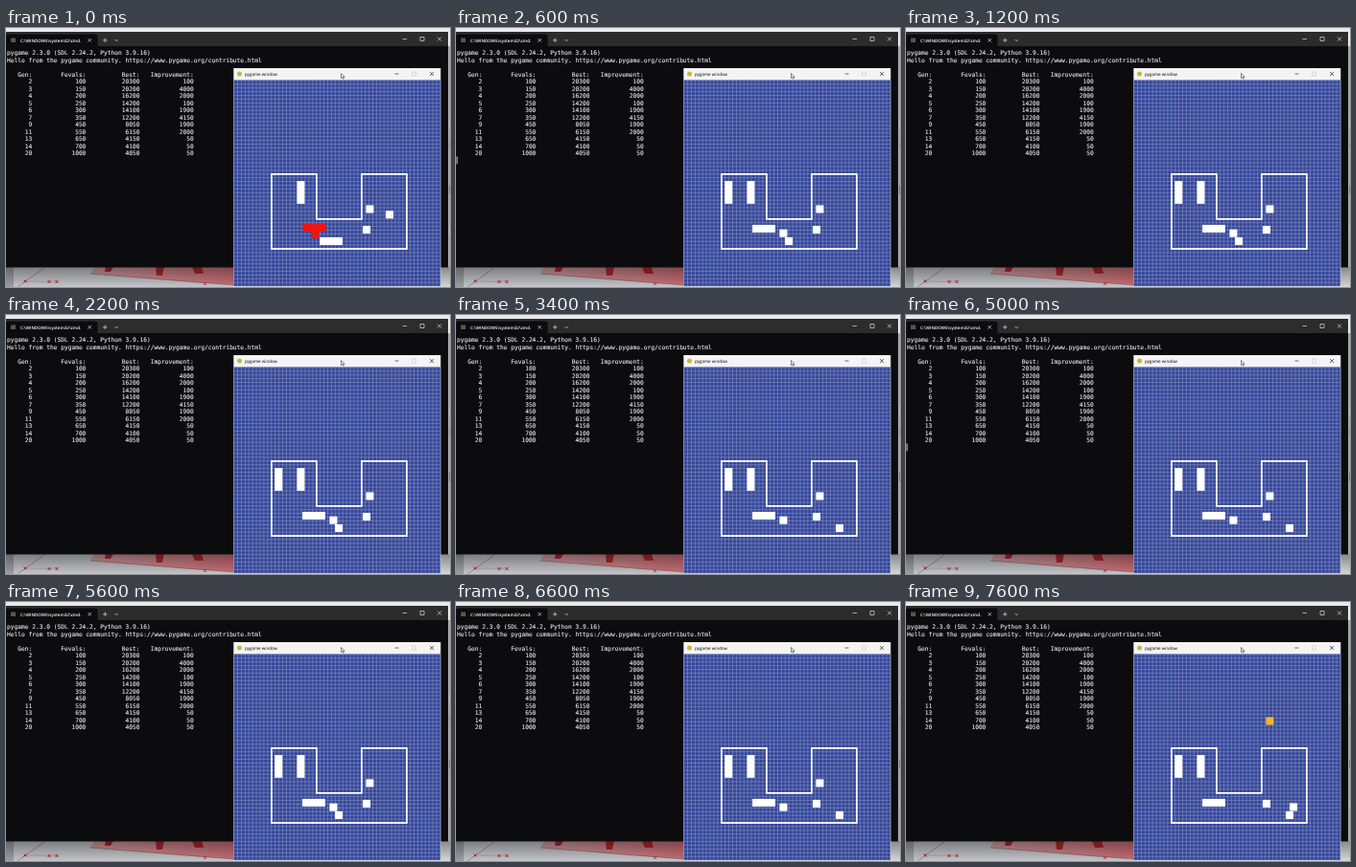
These frames come from a looping animation (463 by 271 pixels, 8000 ms). An HTML page:

```html
<!DOCTYPE html>
<html lang="en">
<head>
<meta charset="utf-8">
<title>Packing run</title>
<style>
  html, body { margin: 0; width: 100%; height: 100%; overflow: hidden; background: #e9e9ea; }
  svg { display: block; width: 463px; height: 271px; }
  text { text-rendering: geometricPrecision; white-space: pre; }
  .mono { font: 6.22px "DejaVu Sans Mono", monospace; fill: #e6e6e6; stroke: #e6e6e6; stroke-width: .12; }
  .ui { font-family: "Open Sans", sans-serif; }
  .icon { fill: none; stroke-width: .7; }
</style>
</head>
<body>
<svg viewBox="0 0 463 271">
  <defs>
    <linearGradient id="shade" x1="0" y1="0" x2="0" y2="1">
      <stop offset="0" stop-color="#000" stop-opacity=".42"/>
      <stop offset="1" stop-color="#000" stop-opacity=".08"/>
    </linearGradient>
    <linearGradient id="blush">
      <stop offset="0" stop-color="#dfa9ae"/>
      <stop offset="1" stop-color="#d8757c"/>
    </linearGradient>
  </defs>

  <!-- desktop behind the windows -->
  <rect width="463" height="271" fill="#e9e9ea"/>
  <rect y="250" width="238" height="21" fill="#d3d5da"/>
  <rect y="250" width="8" height="21" fill="#a9abaf"/>
  <path d="M92 250H238V269L195 266L88 257Z" fill="url(#blush)"/>
  <path d="M88 257L238 269M12 271L40 251" stroke="#8a5558" stroke-width=".5"/>
  <path d="M104 250h8l-3 5h-6zM156 250h9l-2 9h-6zM194 250h10l2 7h-9z" fill="#c0282c"/>
  <path d="M20 265L45 265.500L53 265" stroke="#b99a9c" stroke-width=".6" fill="none"/>
  <path d="M18.500 263.500l3 3m0-3l-3 3M43.500 264l3 3m0-3l-3 3M51.500 264l3 3m0-3l-3 3M206 266l3 3m0-3l-3 3"
        stroke="#c8272b" stroke-width="1"/>
  <rect y="250" width="463" height="21" fill="url(#shade)"/>
  <rect x="461" y="19" width="2" height="231" fill="#a3a4a8"/>
  <path d="M462 95h1v10h-1zM462 208h1v7h-1z" fill="#cdbb5c"/>
  <path d="M462 120h1v5h-1z" fill="#a57aa8"/>
  <path d="M462 165h1v9h-1z" fill="#bb5e5e"/>

  <!-- terminal -->
  <rect y="4" width="461" height="246.500" fill="#0c0c0e"/>
  <rect y="4" width="461" height="15" fill="#2c2c2c"/>
  <path d="M0 19V8Q0 6.500 2 6.500H93Q95.500 6.500 95.500 9V19Z" fill="#0c0c0e"/>
  <rect x="5" y="10.500" width="5" height="4.500" fill="#555"/>
  <text class="ui" x="15" y="14.500" font-size="4.500" font-weight="600" fill="#fff">C:\WINDOWS\system32\cmd.</text>
  <path class="icon" stroke="#ddd" d="M85.500 11l3.500 3.500m0-3.500l-3.500 3.500M101 12.800h4.500M103.250 10.500v4.500M113.500 12l1.700 1.700l1.700-1.700
    M413.500 11.500h4.500M432 9.500h4v4h-4zM450 9.500l4 4m0-4l-4 4"/>
  <g id="log" class="mono"></g>
  <rect id="caret" x=".6" y="134.500" width=".9" height="7.800" fill="#eee"/>

  <!-- game window -->
  <rect x="237.300" y="42" width="216" height="229" fill="#f4f4f5"/>
  <circle cx="243.500" cy="48" r="2.500" fill="#c9b83a"/>
  <text class="ui" x="249" y="49.700" font-size="4.500" fill="#000">pygame window</text>
  <path class="icon" stroke="#333" d="M405.500 48h4M442 46l4 4m0-4l-4 4"/>
  <path class="icon" stroke="#ccc" d="M423.500 46h4v4h-4z"/>
  <rect x="237.500" y="54.500" width="215.400" height="215.500" fill="#34469a"/>
  <path id="grid" stroke="#8591bf" stroke-width=".6"/>
  <path d="M276.900 152.900H323.900V199.900H370.900V152.900H417.900V231.200H276.900Z"
        fill="none" stroke="#fff" stroke-width="1.700"/>
  <g id="parts"></g>
  <path d="M349.500 47.500v5l1.200-1l.8 1.700l.8-.4l-.8-1.600h1.600z" fill="#fff" stroke="#111" stroke-width=".5"/>
</svg>
<script>
const LOOP = 8000;
const byId = id => document.getElementById(id);

function add(parent, tag, attrs, text = "") {
  const el = document.createElementNS("http://www.w3.org/2000/svg", tag);
  for (const key in attrs) el.setAttribute(key, attrs[key]);
  el.textContent = text;
  parent.append(el);
  return el;
}

// Terminal output
const runs = [
  "2 100 20300 100", "3 150 20200 4000", "4 200 16200 2000", "5 250 14200 100",
  "6 300 14100 1900", "7 350 12200 4150", "9 450 8050 1900", "11 550 6150 2000",
  "13 650 4150 50", "14 700 4100 50", "20 1000 4050 50"
];
const widths = [7, 15, 15, 15];
const toRow = line => line.split(" ").map((s, i) => s.padStart(widths[i])).join("");
const lines = [
  "pygame 2.3.0 (SDL 2.24.2, Python 3.9.16)",
  "Hello from the pygame community. https://www.pygame.org/contribute.html",
  "",
  ...["Gen: Fevals: Best: Improvement:", ...runs].map(toRow)
];
lines.forEach((line, i) => add(byId("log"), "text", { x: 1, y: 28.2 + i * 7.5 }, line));

// Board grid
const cell = 3.915;
let grid = "";
for (let i = 0; i <= 55; i++) {
  const d = i * cell;
  grid += `M${237.6 + d} 54.5V270M237.5 ${54.9 + d}H452.9`;
}
byId("grid").setAttribute("d", grid);

// Parts, given by their centres
const unit = 8.1, long = 23.8;
const part = (w, h) => (x, y, fill = "#fff") => ({ x: x - w / 2, y: y - h / 2, width: w, height: h, fill });
const box = part(unit, unit), wide = part(long, unit), tall = part(unit, long);

const right = tall(307.4, 172), left = tall(284.2, 172);
const upper = box(379.4, 189.5), lower = box(376, 211), middle = box(341.4, 214.7);
const packed = [left, right, wide(321, 210), lower];
const near = [...packed, upper, middle, box(347, 223)];
const far = [...packed, upper, middle, box(400, 223)];
const red = "#f5120f";

const poses = [
  [0, [right, wide(339, 223), upper, box(400, 195.3), lower, wide(321.4, 209, red), box(322.6, 216, red)]],
  [200, near],
  [2600, far],
  [5400, near],
  [6200, far],
  [7600, [...packed, box(404, 214.5), box(400, 223), box(379.4, 124.5, "#f6b52c")]]
].map(([start, rects]) => {
  const group = add(byId("parts"), "g", {});
  rects.forEach(r => add(group, "rect", r));
  return { start, group };
});

const caretOn = [[600, 1200], [1600, 2200], [2800, 3400], [4200, 4400], [5000, 5600], [6000, 6600], [7200, 7600]];
const show = (el, on) => el.setAttribute("visibility", on ? "visible" : "hidden");

function draw(t) {
  poses.forEach(({ start, group }, i) => {
    const end = i + 1 < poses.length ? poses[i + 1].start : LOOP;
    show(group, t >= start && t < end);
  });
  show(byId("caret"), caretOn.some(([from, to]) => t >= from && t < to));
}

const began = performance.now();
function tick() {
  draw((performance.now() - began) % LOOP);
  requestAnimationFrame(tick);
}
tick();
</script>
</body>
</html>
```
